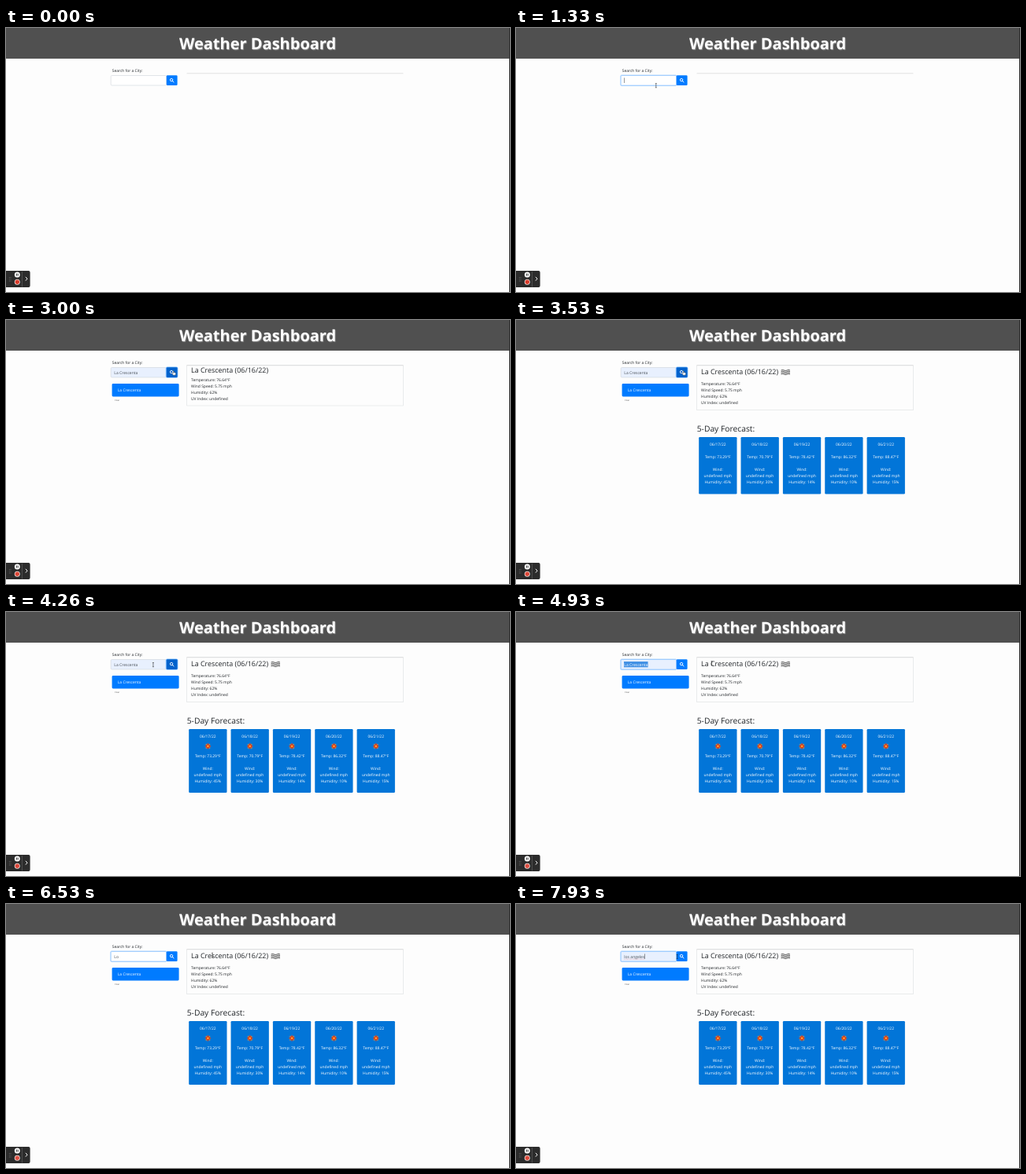
Animation, 640 px wide and 336 px high, one loop 8 s. Source, as an HTML page:

```html
<!DOCTYPE html>
<html lang="en">
<head>
<meta charset="utf-8">
<title>Weather Dashboard</title>
<style>
  html, body { margin: 0; width: 100%; height: 100%; overflow: hidden; background: #fdfdfd; }
  svg { display: block; width: 640px; height: 336px; }
  text { font: 4.95px "Open Sans", "Noto Sans", sans-serif; fill: #212529; text-rendering: geometricPrecision; white-space: pre; }
  .title { font-size: 20px; font-weight: 700; fill: #fff; text-anchor: middle; text-shadow: .7px 1.2px 1px #999; }
  .city { font-size: 8.95px; font-weight: 500; }
  .forecast { font-size: 10.3px; font-weight: 500; }
  .field { font-size: 5.05px; fill: #495057; }
  .tiny { font-size: 2.6px; fill: #555; }
  .light { fill: #fff; }
  .card text { fill: #fff; text-anchor: middle; }
</style>
</head>
<body>
<svg id="stage" viewBox="0 0 640 336"></svg>
<script>
const LOOP = 8000, STEP = 1000 / 15;
const stage = document.getElementById('stage');

function add(parent, tag, attrs = {}, content) {
  const node = document.createElementNS('http://www.w3.org/2000/svg', tag);
  set(node, attrs);
  if (content !== undefined) node.textContent = content;
  parent.appendChild(node);
  return node;
}
function set(node, attrs) {
  for (const key in attrs) node.setAttribute(key, attrs[key]);
}
const group = (parent, attrs) => add(parent, 'g', attrs);
const rect = (parent, x, y, width, height, fill, more) =>
  add(parent, 'rect', { x, y, width, height, fill, ...more });
const circle = (parent, cx, cy, r, fill, more) => add(parent, 'circle', { cx, cy, r, fill, ...more });
const line = (parent, d, stroke, width, more) =>
  add(parent, 'path', { d, stroke, 'stroke-width': width, fill: 'none', ...more });
const text = (parent, x, y, content, cls = '') => add(parent, 'text', { x, y, class: cls }, content);
const show = (node, on) => node.setAttribute('visibility', on ? 'inherit' : 'hidden');

// Page
rect(stage, 0, 0, 640, 336, '#fdfdfd');
rect(stage, 0, 0, 640, 39, '#505050');
text(stage, 319.6, 26.6, 'Weather Dashboard', 'title');
rect(stage, 639, 0, 1, 336, '#2b2b2b');
text(stage, 134.8, 55.8, 'Search for a City:');

// Search form
const glow = rect(stage, 132.4, 59.6, 72, 14.4, '#007bff', { rx: 1.8 });
const box = rect(stage, 133.2, 60.5, 70.4, 12.5, '#fff', { rx: 1.2, 'stroke-width': .6 });
const mark = rect(stage, 137, 63.1, 0, 7.2, '#3f8fe4');
const typed = text(stage, 137.3, 68.6, '', 'field');
const squiggle = line(stage, '', '#d9534f', .5, { 'stroke-dasharray': '.8 .5', opacity: .7 });
const caret = rect(stage, 0, 63.4, .5, 6.6, '#333');
const ring = rect(stage, 202.8, 59.4, 15.6, 14.4, '#80bdff', { rx: 2 });
const button = rect(stage, 203.8, 60.3, 13.8, 12.7, '#007bff', { rx: 1.2 });
circle(stage, 210.1, 66.1, 1.7, 'none', { stroke: '#fff', 'stroke-width': .9 });
line(stage, 'M211.3 67.3L213 69', '#fff', 1, { 'stroke-linecap': 'round' });

// History
const history = group(stage);
rect(history, 134.6, 81, 85, 16.4, '#007bff', { rx: 1.4 });
text(history, 141.8, 91.2, 'La Crescenta', 'light');
text(history, 138, 103.4, 'Clear', 'tiny');

// Current weather
const panel = rect(stage, 229.7, 57.7, 274.8, 0, 'none', { stroke: '#dcdfe2', 'stroke-width': .6 });
line(stage, 'M229.5 57.8H504.5', '#d4d4d4', .7);
const now = group(stage);
const city = text(now, 235, 67, 'La Crescenta (06/16/22)', 'city');
const readings = group(now);
['Temperature: 76.64°F', 'Wind Speed: 5.75 mph', 'Humidity: 62%', 'UV Index: undefined']
  .forEach((s, i) => text(readings, 235, 77.7 + 8 * i, s));
const mist = group(now);
for (let i = 0; i < 4; i++) {
  line(mist, `M336.6 ${64 + 1.7 * i}q1.9 -1.1 3.8 0t3.8 0t3.8 0`, '#333', .8);
}

// Forecast
const forecast = group(stage);
text(forecast, 229.7, 141.5, '5-Day Forecast:', 'forecast');
const days = [[73.29, 45], [70.79, 30], [78.42, 14], [86.32, 10], [88.47, 15]];
const cards = days.map(([temp, humidity], i) => {
  const g = group(forecast, { class: 'card', transform: `translate(${232.2 + 53.35 * i} 149)` });
  const back = rect(g, 0, 0, 48.3, 72.5, '#0275d8', { rx: 1.3 });
  text(g, 24.1, 11.4, `06/${17 + i}/22`);
  const sun = group(g, { transform: 'translate(24.2 21.8)' });
  for (let k = 0; k < 8; k++) {
    line(sun, 'M0 -2V-3.7', k % 2 ? '#f0a020' : '#e8481c', 1.3, { transform: `rotate(${45 * k})` });
  }
  circle(sun, 0, 0, 2.5, '#e2301a');
  circle(sun, 0, 0, 1.4, '#f9a825');
  const body = group(g);
  [`Temp: ${temp}°F`, '', 'Wind:', 'undefined mph', `Humidity: ${humidity}%`]
    .forEach((s, k) => text(body, 24.1, 27.3 + 8 * k, s));
  return { back, sun, body };
});

// Recorder controls
const recorder = group(stage);
rect(recorder, -3, 309, 33.6, 21, '#2b2b2b', { rx: 2 });
for (let i = 0; i < 6; i++) circle(recorder, 4.2 + 1.8 * (i % 2), 317.8 + 2.1 * (i >> 1), .45, '#999');
circle(recorder, 14.3, 314, 3.5, '#fff');
line(recorder, 'M13.4 312.5V315.5M15.2 312.5V315.5', '#2b2b2b', .9);
circle(recorder, 14.3, 323.2, 3.5, '#f3e4e1');
const dot = circle(recorder, 14.3, 323.2, 2.7, '#d93a2b');
line(recorder, 'M20.4 310V329.5', '#777', .5);
line(recorder, 'M24.9 316.8L27.1 319.2L24.9 321.6', '#fff', 1);

// Pointers
const beam = group(stage);
line(beam, 'M-1 -2.6H1M0 -2.6V2.6M-1 2.6H1', '#222', .55);
const arrow = add(stage, 'path', { d: 'M0 0V5.4L1.3 4.3L2.1 6.1L3 5.7L2.2 4H3.9Z', fill: '#fff', stroke: '#222', 'stroke-width': .4 });
const hand = add(stage, 'path', {
  d: 'M-.5 -2.4q.5 -.6 1 0V-.6L2.4 -.1Q3 .1 2.9 .8L2.4 2.9H-.6L-2 .8Q-1.7 -.1 -.5 .5Z',
  fill: '#fff', stroke: '#222', 'stroke-width': .4
});
const pointers = { beam, arrow, hand };

// time, x, y
const path = [
  [330, 76, 236], [460, 128, 140], [600, 196, 70], [660, 177.5, 68], [790, 177.5, 68],
  [860, 177.8, 73.2], [2000, 177.8, 73.2], [2200, 212.8, 67.3], [4070, 212.8, 67.3],
  [4400, 137.4, 66.8], [4530, 137.4, 66.8], [4860, 248.6, 65.2], [5900, 248.6, 65.2],
  [6200, 262, 65], [6660, 262, 65], [6930, 168, 78], [7590, 168, 78], [7860, 204.7, 67]
];
function pointerAt(t) {
  const i = path.findIndex(p => p[0] > t);
  if (i < 0) return path[path.length - 1].slice(1);
  if (i === 0) return path[0].slice(1);
  const [t0, x0, y0] = path[i - 1], [t1, x1, y1] = path[i];
  const k = (t - t0) / (t1 - t0), e = k * k * (3 - 2 * k);
  return [x0 + (x1 - x0) * e, y0 + (y1 - y0) * e];
}
function pointerKind(t) {
  if (t < 330 || (t >= 1450 && t < 1990)) return '';
  if (t < 590) return 'arrow';
  if (t >= 2120 && t < 4130) return 'hand';
  return t >= 6860 && t < 7650 ? 'arrow' : 'beam';
}

// time, text, autofilled
const entries = [
  [0, '', false], [1395, 'La Crescenta', true], [5300, '', false],
  [5860, 'L', false], [6000, 'Lo', false], [6860, 'los angeles', true]
];

function drawField(t, x) {
  const [since, value, filled] = entries.filter(e => e[0] <= t).pop();
  const inButton = t >= 2190 && t < 4400;
  const focus = inButton ? 0 : Math.min(1, Math.max(0, (t - 930) / 200));
  set(glow, { opacity: .28 * focus });
  set(box, { fill: filled ? '#e8f0fe' : '#fff', stroke: focus > .5 ? '#80bdff' : '#ced4da' });
  typed.textContent = value;
  typed.style.fill = filled && t < 1855 ? '#6b7076' : '';
  const width = value ? typed.getComputedTextLength() : 0;

  const selecting = t >= 4530 && t < 5300;
  const chosen = selecting ? Math.max(0, Math.min(width + .5, x - 137)) : 0;
  set(mark, { width: chosen });
  if (chosen > width * .6) typed.style.fill = '#fff';

  const spelled = value === 'los angeles';
  set(squiggle, { d: spelled ? `M137.3 70.1h${width}` : '' });
  const blinkFrom = t < 1395 ? 1000 : since;
  show(caret, focus > .3 && chosen < 1 && Math.floor((t - blinkFrom) / 530) % 2 === 0);
  set(caret, { x: 137.4 + width });

  show(ring, inButton);
  set(button, { fill: inButton ? '#0062cc' : '#007bff' });
}

function drawResults(t) {
  const found = t >= 2460, full = t >= 3130, sunny = t >= 3730;
  show(history, found);
  show(now, found);
  show(panel, found);
  show(mist, full);
  show(forecast, full);
  set(panel, { height: full ? 57 : 51.3 });
  set(city, { y: full ? 68.7 : 67 });
  set(readings, { transform: `translate(0 ${full ? 5.6 : 0})` });
  for (const { back, sun, body } of cards) {
    set(back, { height: sunny ? 81 : 72.5 });
    show(sun, full && sunny);
    set(body, { transform: `translate(0 ${sunny ? 8.7 : 0})` });
  }
}

function draw(time) {
  const t = Math.floor((time % LOOP + 5) / STEP) * STEP;
  const [x, y] = pointerAt(t);
  const kind = pointerKind(t);
  drawField(t, x);
  drawResults(t);
  for (const name in pointers) {
    show(pointers[name], name === kind);
    set(pointers[name], { transform: `translate(${x} ${y})` });
  }
  set(dot, { opacity: t < 2000 ? 1 : .92 + .08 * Math.cos((t - 2000) / 200) });
}

const start = performance.now();
function tick() {
  draw(performance.now() - start);
  requestAnimationFrame(tick);
}
tick();
</script>
</body>
</html>
```
